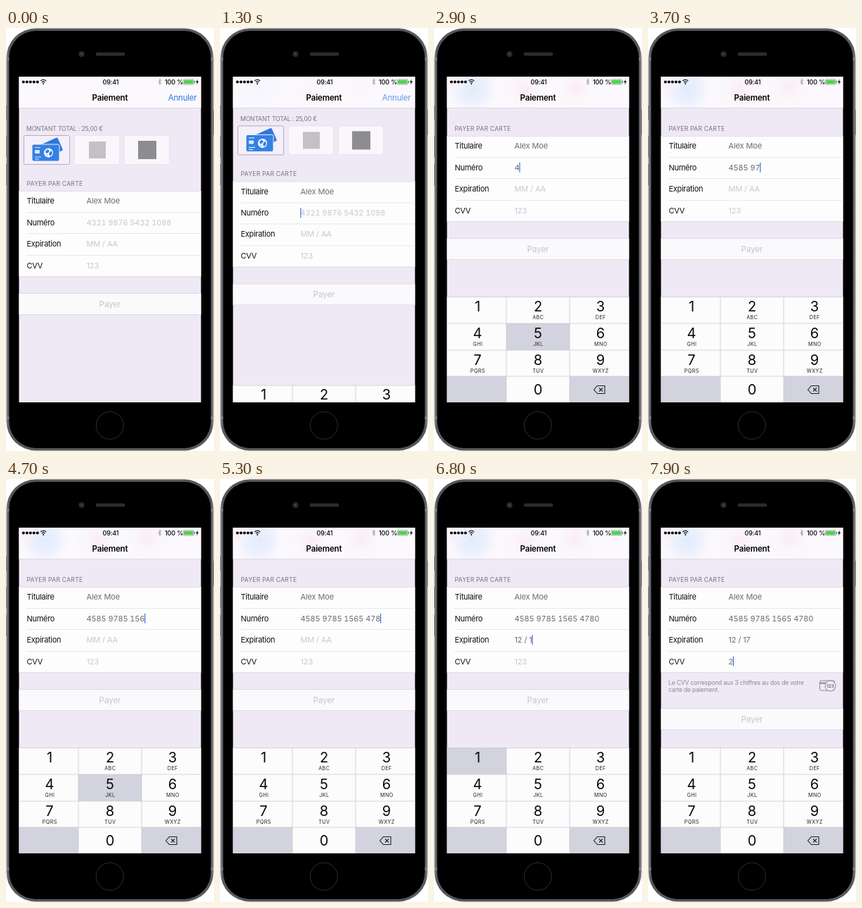
Write an HTML page that moves like this. It is 296 px wide and 600 px high and loops after 8 s.

```html
<!DOCTYPE html>
<html lang="fr">
<head>
<meta charset="utf-8">
<title>Paiement</title>
<style>
html, body { margin: 0; width: 100%; height: 100%; overflow: hidden; background: #fff; }
svg { display: block; width: 296px; height: 600px; font-family: Inter, Roboto, sans-serif; }
text { white-space: pre; }
.mid { text-anchor: middle; }
.label { font-size: 11px; letter-spacing: -.3px; fill: #111; }
.value { font-size: 11px; letter-spacing: -.12px; }
.long { font-variant-numeric: tabular-nums; }
.head { font-size: 8.6px; fill: #77747d; }
.hint { font-size: 8.5px; letter-spacing: -.17px; fill: #8b8892; }
.status { font-size: 9px; font-weight: 500; letter-spacing: -.15px; }
.digit { font-size: 20px; fill: #0a0a0a; }
.abc { font-size: 7.2px; letter-spacing: .4px; fill: #222; }
</style>
</head>
<body>
<svg viewBox="0 0 296 600">
  <defs>
    <clipPath id="screen"><path d="M18.500 69h259v462H18.500z"/></clipPath>
    <clipPath id="bar"><path d="M18 69h260v44H18z"/></clipPath>
    <linearGradient id="metal">
      <stop stop-color="#8b8c90"/><stop offset=".012" stop-color="#57585c"/>
      <stop offset=".988" stop-color="#57585c"/><stop offset="1" stop-color="#8b8c90"/>
    </linearGradient>
    <radialGradient id="blue"><stop stop-color="#d3e4fc"/><stop offset=".6" stop-color="#e1ebfc" stop-opacity=".8"/><stop offset="1" stop-color="#f4f4fd" stop-opacity="0"/></radialGradient>
    <radialGradient id="pink"><stop stop-color="#f9e6ef"/><stop offset="1" stop-color="#fbf4f9" stop-opacity="0"/></radialGradient>
  </defs>

  <!-- phone body -->
  <path d="M0 110h3v20H0zM0 153h3v30H0zM0 193h3v30H0zM293 116h3v36h-3z" fill="#77787c"/>
  <rect x=".500" y=".500" width="295" height="599" rx="42" fill="url(#metal)"/>
  <path d="M1 42h4v4H1zM291 42h4v4h-4zM1 551h4v4H1zM291 551h4v4h-4z" fill="#85868a"/>
  <rect x="4.500" y="4" width="287" height="592" rx="38"/>
  <circle cx="107.500" cy="37" r="3.600" fill="#222328" stroke="#35363b"/>
  <circle cx="107.500" cy="37" r="1.300" fill="#4b5468"/>
  <rect x="128" y="35" width="41" height="4" rx="2" fill="#2c2b2a" stroke="#3b3936" stroke-width=".6"/>
  <circle cx="147.800" cy="563.800" r="19.500" stroke="#2e2e32"/>

  <g clip-path="url(#screen)">
    <path d="M18 69h260v463H18z" fill="#efe9f6"/>
    <g id="page">
      <g id="tiles">
        <text x="29" y="145.500" class="head" letter-spacing="-.13">MONTANT TOTAL : 25,00 €</text>
        <rect x="25.500" y="152.500" width="65" height="41" rx="2" fill="#f4f0fa" stroke="#b6a9c6"/>
        <rect x="97.500" y="152.500" width="64" height="41" rx="2" fill="#f9f7fb" stroke="#e8e4ec"/>
        <rect x="168.500" y="152.500" width="64" height="41" rx="2" fill="#f9f7fb" stroke="#e8e4ec"/>
        <g stroke="#f4f0fa">
          <rect x="47" y="160" width="32" height="21" rx="2.500" fill="#2f78dc" transform="rotate(-24 63 170.500)"/>
          <rect x="37" y="165" width="39" height="24" rx="2.500" fill="#3580e4"/>
        </g>
        <path d="M41 169.500h8M41 183h9M41 186h6" stroke="#d9e8fc" stroke-width="1.200"/>
        <rect x="41" y="173" width="7" height="5" rx="1" fill="#d9e8fc"/>
        <circle cx="60.500" cy="177" r="6.500" fill="#fff"/>
        <path d="M56 175l3-3 3 2-2 3-3 1zM62 176l3-2 1 4-3 4-2-3zM57 179l2 1v2z" fill="#3580e4"/>
        <rect x="118" y="161" width="24" height="24" fill="#c3c1c6"/>
        <rect x="188" y="160" width="26" height="26" fill="#8d8c90"/>
      </g>
      <text x="29.500" y="223.500" class="head" letter-spacing=".25">PAYER PAR CARTE</text>
      <path d="M18 231h260v121H18z" fill="#fdfdfe"/>
      <path d="M29 261.500h249M29 291.500h249M29 322.500h249" stroke="#e9e7ec"/>
      <path d="M18 231.500h260M18 352.500h260" stroke="#e1dce8"/>
      <g id="rows"></g>
      <rect id="caret" width="1.200" height="14" fill="#4668dc"/>
      <g id="hint">
        <text x="29" y="369.500" class="hint">Le CVV correspond aux 3 chiffres au dos de votre</text>
        <text x="29" y="379.500" class="hint">carte de paiement.</text>
        <g fill="#efe9f6" stroke="#8b8892">
          <rect x="244.500" y="364" width="21" height="14" rx="2"/>
          <path d="M245 367.500h20" stroke-width="2"/>
          <circle cx="259.500" cy="371.500" r="7.500"/>
        </g>
        <text x="259.500" y="374" class="mid" font-size="6.500" font-weight="700" fill="#77747d">123</text>
      </g>
      <g id="pay">
        <path d="M18 377h260v29H18z" fill="#fafafc"/>
        <path d="M18 376.500h260M18 406.500h260" stroke="#e1dce8"/>
        <text x="148" y="395.800" class="mid" font-size="11.500" fill="#c6c4ca">Payer</text>
      </g>
    </g>

    <!-- navigation and status bars -->
    <path d="M18 69h260v44H18z" fill="#fbf9fd"/>
    <g id="blobs" clip-path="url(#bar)">
      <circle cx="55" cy="86" r="36" fill="url(#blue)"/>
      <circle cx="28" cy="78" r="18" fill="url(#pink)"/>
      <circle cx="130" cy="88" r="32" fill="url(#pink)"/>
      <circle cx="201" cy="84" r="30" fill="url(#pink)"/>
    </g>
    <path d="M18 113.500h260" stroke="#dcd7e2"/>
    <g id="dots"></g>
    <path d="M49.300 75a5.400 5.400 0 0 1 7.800 0M51 77a3 3 0 0 1 4.400 0" fill="none" stroke="#111" stroke-width="1.300"/>
    <circle cx="53.200" cy="79" r="1"/>
    <text x="149" y="79.500" class="status mid">09:41</text>
    <path d="M216.800 74.300l4 4-2 2v-8l2 2-4 4" fill="none" stroke="#8c8b90" stroke-width=".8"/>
    <text x="226" y="79.500" class="status">100 %</text>
    <rect x="252" y="73" width="15.500" height="7" rx="1.500" fill="#fff" stroke="#777" stroke-width=".7"/>
    <rect x="253" y="74" width="13.500" height="5" rx=".7" fill="#4cd551"/>
    <path d="M268.500 75.300v2.500" stroke="#777"/>
    <path d="M273 72.500l-3 4.500h2l-1 3.500 3.200-4.700h-2z"/>
    <text x="148" y="102.500" class="mid" font-size="11.500" font-weight="600" letter-spacing="-.15">Paiement</text>
    <text id="cancel" x="271.500" y="102.500" text-anchor="end" font-size="11.500" letter-spacing="-.2" fill="#2f78e0">Annuler</text>

    <g id="pad"></g>
  </g>
</svg>
<script>
const $ = id => document.getElementById(id);
const NS = 'http://www.w3.org/2000/svg';
function add(parent, tag, attrs, text = '') {
  const el = document.createElementNS(NS, tag);
  for (const k in attrs) el.setAttribute(k, attrs[k]);
  el.textContent = text;
  return parent.appendChild(el);
}

for (let i = 0; i < 5; i++) add($('dots'), 'circle', { cx: 24.8 + i * 5, cy: 76.5, r: 2 });

// form rows: label, placeholder, extra class
const INK = '#6c6b72', FAINT = '#c9c8ce';
const rowY = i => 245.3 + i * 30.4;
const fields = [['Titulaire', 'Alex Moe'], ['Numéro', '4321 9876 5432 1098', 'long'],
  ['Expiration', 'MM / AA'], ['CVV', '123']].map(([label, hint, extra = ''], i) => {
  const y = rowY(i) + 4;
  add($('rows'), 'text', { x: 29.5, y, class: 'label' }, label);
  return { hint, el: add($('rows'), 'text', { x: 114.5, y, class: 'value ' + extra, fill: INK }, hint) };
});

// keypad
const colX = [18, 103, 193, 278], colMid = [62, 148, 237], rowTop = [381, 419, 457, 494, 532];
const letters = ['', 'ABC', 'DEF', 'GHI', 'JKL', 'MNO', 'PQRS', 'TUV', 'WXYZ'];
const WHITE = '#fcfcfd', GREY = '#d2d3de', keys = {};
for (let i = 0; i < 12; i++) {
  const c = i % 3, r = i / 3 | 0, top = rowTop[r];
  const name = i < 9 ? i + 1 : i === 10 ? 0 : '';
  const box = add($('pad'), 'rect', { x: colX[c], y: top, width: colX[c + 1] - colX[c],
    height: rowTop[r + 1] - top, fill: name === '' ? GREY : WHITE });
  if (name === '') continue;
  keys[name] = box;
  add($('pad'), 'text', { x: colMid[c], y: top + (r < 3 ? 20.6 : 25.8), class: 'digit mid' }, name);
  if (letters[i]) add($('pad'), 'text', { x: colMid[c] + .3, y: top + 31.5, class: 'abc mid' }, letters[i]);
}
add($('pad'), 'path', { d: 'M18 381.5h260M18 419h260M18 457h260M18 494h260M103 381v151M193 381v151',
  stroke: '#c9c9d1', 'stroke-width': .8 });
add($('pad'), 'path', { d: 'M227.500 513l5-5.500h10.500v11h-10.500zM235 510.500l5 5m0-5l-5 5',
  fill: 'none', stroke: '#222', 'stroke-width': 1.1 });

// taps: key, press time, how long it stays lit; the digit shows 100 ms after the press
const taps = [
  [4, 2700, 100], [5, 2900, 100], [8, 3000, 100], [5, 3200, 100],
  [9, 3400, 0], [7, 3600, 0], [8, 3750, 0], [5, 3900, 100],
  [1, 4200, 100], [5, 4400, 100], [6, 4550, 100], [5, 4700, 100],
  [4, 4900, 100], [7, 5100, 100], [8, 5200, 100], [0, 5500, 100],
  [1, 6300, 100], [2, 6500, 100], [1, 6700, 200], [7, 6900, 100],
  [2, 7800, 100]
];
const ease = (t, from, len) => {
  const p = Math.min(1, Math.max(0, (t - from) / len));
  return p * p * (3 - 2 * p);
};
const group = s => s.replace(/(.{4})(?=.)/g, '$1 ');
const expiry = s => s.length < 2 ? s : s.slice(0, 2) + ' / ' + s.slice(2);
const caretOff = [[2000, 2500], [5800, 6300], [7500, 7800]];

function draw(t) {
  const up = ease(t, 1200, 380), help = ease(t, 7000, 300);
  $('page').setAttribute('transform', `translate(0 ${-78 * up})`);
  $('pad').setAttribute('transform', `translate(0 ${152 * (1 - up)})`);
  $('pay').setAttribute('transform', `translate(0 ${27 * help})`);
  $('hint').setAttribute('opacity', help);
  $('tiles').setAttribute('opacity', 1 - ease(t, 1350, 230));
  $('cancel').setAttribute('opacity', 1 - ease(t, 1200, 300));
  $('blobs').setAttribute('opacity', .65 * up);

  for (const k in keys) {
    const lit = taps.some(([n, at, len]) => n == k && t >= at && t < at + len);
    keys[k].setAttribute('fill', lit ? GREY : WHITE);
  }

  const typed = taps.filter(tap => t >= tap[1] + 100).map(tap => tap[0]).join('');
  const values = [, group(typed.slice(0, 16)), expiry(typed.slice(16, 20)), typed.slice(20)];
  for (let i = 1; i < 4; i++) {
    const { el, hint } = fields[i];
    el.textContent = values[i] || hint;
    el.setAttribute('fill', values[i] ? INK : FAINT);
  }

  const focus = typed.length < 16 ? 1 : typed.length < 20 ? 2 : 3;
  const shown = t >= 1200 && !caretOff.some(([a, b]) => t >= a && t < b);
  $('caret').setAttribute('opacity', shown ? 1 : 0);
  $('caret').setAttribute('x', 114.3 + (values[focus] ? fields[focus].el.getComputedTextLength() : 0));
  $('caret').setAttribute('y', rowY(focus) - 7);
}

const start = performance.now();
function tick() {
  draw((performance.now() - start) % 8000);
  requestAnimationFrame(tick);
}
tick();
</script>
</body>
</html>
```
